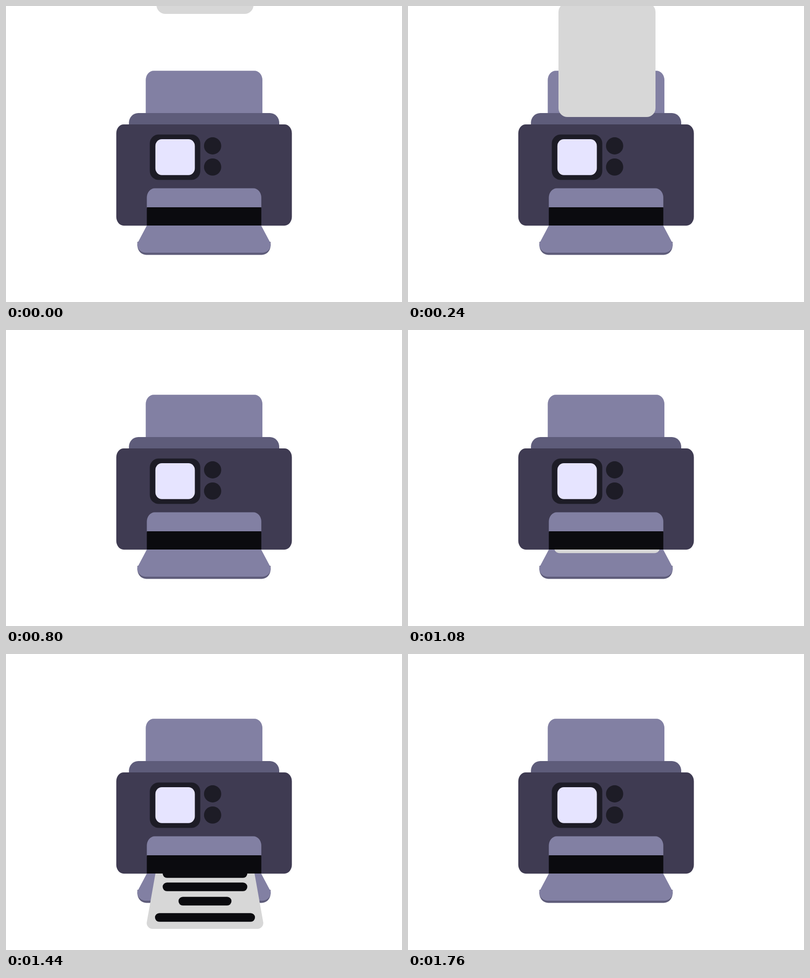
An HTML page with a canvas that plays this animation: 800x600 px, repeating every 1.8 s.

```html
<!DOCTYPE html>
<html lang="en">
<head>
<meta charset="utf-8">
<title>Printer</title>
<style>
  html, body { margin: 0; width: 100%; height: 100%; overflow: hidden; background: #fff; }
  canvas { display: block; }
</style>
</head>
<body>
<canvas id="stage" width="800" height="600"></canvas>
<script>
const ctx = document.getElementById('stage').getContext('2d');
const LOOP = 1800, STEP = 40;
const LILAC = '#8280a3', MAUVE = '#5e5c7a', BODY = '#3f3b52',
      DARK = '#1d1c26', BLACK = '#0b0b0f', SCREEN = '#e6e4ff', PAPER = '#d7d7d7';

// Feed sheet: time, top edge, speed
const FEED = [[0, -215, .93], [240, -6, .785], [480, 156, .58], [560, 199.5, .44], [800, 241.5, 0]];

// Printed lines: top edge above the sheet's lower edge, half width
const LINES = [[-32, 101], [-65, 53.5], [-94, 85.5], [-121, 85.5]];

function box(color, x0, y0, x1, y1, radii) {
  ctx.fillStyle = color;
  ctx.beginPath();
  ctx.roundRect(x0, y0, x1 - x0, y1 - y0, radii);
  ctx.fill();
}

function dot(x, y, r) {
  ctx.fillStyle = DARK;
  ctx.beginPath();
  ctx.arc(x, y, r, 0, 2 * Math.PI);
  ctx.fill();
}

const corner = (x, y) => ({ x, y });
const topOnly = (x, y) => [corner(x, y), corner(x, y), 0, 0];

function hermite(keys, t) {
  const i = keys.findIndex(k => t < k[0]);
  const [t0, y0, v0] = keys[i - 1], [t1, y1, v1] = keys[i];
  const h = t1 - t0, u = (t - t0) / h, w = 1 - u;
  return y0 * w * w * (1 + 2 * u) + y1 * u * u * (3 - 2 * u)
       + h * u * w * (v0 * w - v1 * u);
}

function feedSheet(t) {
  if (t >= 800) return;
  const top = hermite(FEED, t);
  box(PAPER, 304, top, 500, top + 231, [corner(18, 18)]);
}

function tray() {
  box(MAUVE, 265.5, 478, 534.5, 504.5, [0, 0, corner(18, 19), corner(18, 19)]);
  ctx.fillStyle = LILAC;
  ctx.beginPath();
  ctx.moveTo(284.5, 445);
  ctx.lineTo(266, 480);
  ctx.bezierCurveTo(263, 490, 271, 500, 283, 500);
  ctx.lineTo(517, 500);
  ctx.bezierCurveTo(529, 500, 537, 490, 534, 480);
  ctx.lineTo(515.5, 445);
  ctx.fill();
}

function printedSheet(t) {
  if (t < 960 || t >= 1760) return;
  const bottom = 445 + 49 * Math.pow((t - 940) / 340, 2.15);
  const scale = 1 + (bottom - 557) * .00089;
  ctx.save();
  ctx.beginPath();
  ctx.rect(0, 445, 800, 155);
  ctx.clip();
  ctx.translate(402, bottom);
  ctx.scale(scale, scale);
  ctx.fillStyle = PAPER;
  ctx.beginPath();
  ctx.moveTo(0, -141);
  ctx.arcTo(-95, -141, -120, 0, 12);
  ctx.arcTo(-120, 0, 120, 0, 12);
  ctx.arcTo(120, 0, 95, -141, 12);
  ctx.arcTo(95, -141, 0, -141, 12);
  ctx.fill();
  for (const [y, half] of LINES) box(BLACK, -half, y, half, y + 17.5, 8.75);
  ctx.restore();
}

function draw(t) {
  ctx.fillStyle = '#fff';
  ctx.fillRect(0, 0, 800, 600);
  box(LILAC, 282.3, 131.3, 518, 240, topOnly(16, 19));
  box(MAUVE, 248.3, 217, 552, 245, topOnly(19, 20));
  feedSheet(t);
  box(BODY, 222.8, 240, 577.5, 445.2, [corner(15, 18)]);
  box(DARK, 290.5, 260.5, 392.5, 352.5, [corner(18, 18)]);
  box(SCREEN, 301.8, 270, 381.5, 342.8, [corner(13, 14)]);
  dot(417.4, 283.5, 17.4);
  dot(417.4, 326.4, 17.4);
  box(LILAC, 284.5, 369.5, 515.8, 410, topOnly(16, 19));
  box(BLACK, 284.5, 408, 515.8, 445, 0);
  tray();
  printedSheet(t);
}

const start = performance.now();
function tick() {
  const t = (performance.now() - start + 1) % LOOP;
  draw(Math.floor(t / STEP) * STEP);
  requestAnimationFrame(tick);
}
tick();
</script>
</body>
</html>
```
